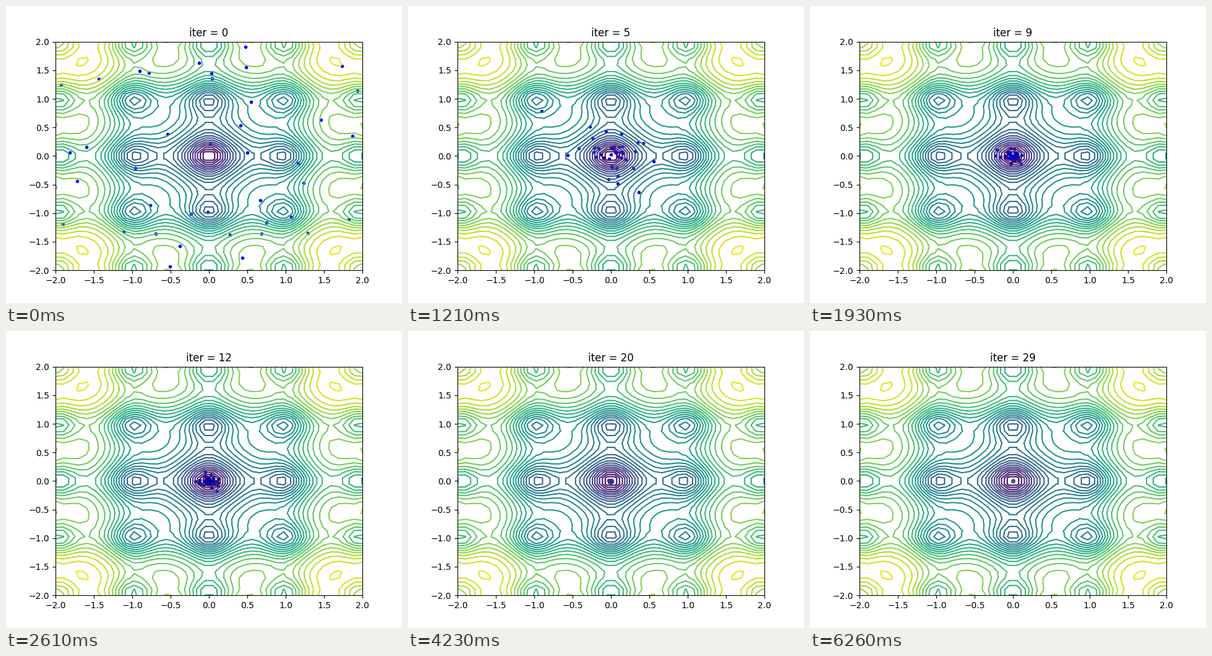
A matplotlib script for the animation above (6.28 s loop, 640 by 480 pixels).

```python
import numpy as np
import matplotlib.pyplot as plt
from matplotlib.animation import FuncAnimation
from matplotlib.colors import LinearSegmentedColormap

INTERVAL = 20
LOOP = 6280
COUNT = 40
ITERS = 30
STEPS = 10  # interpolation steps per iteration

FADE = LinearSegmentedColormap.from_list('fade', [
    (0, 'blue'), (0.3, 'mediumblue'), (0.55, 'navy'), (0.7, '#423682'), (1, '#32588c')])


def ackley(x, y):
    bowl = -20 * np.exp(-0.2 * np.sqrt(0.5 * (x ** 2 + y ** 2)))
    waves = -np.exp(0.5 * (np.cos(2 * np.pi * x) + np.cos(2 * np.pi * y)))
    return bowl + waves + 20 + np.e


def swarm():
    """Positions per iteration: one iteration at rest, then closing in on the optimum."""
    rng = np.random.default_rng(7)
    start = rng.uniform(-1.95, 1.95, (COUNT, 2))
    path = [start, start]
    for i in range(2, ITERS + 1):
        spread = np.exp(np.interp(i, [2, 6, 9, 16, 20, 29],
                                  np.log([0.34, 0.28, 0.08, 0.04, 0.013, 0.001])))
        path.append(rng.laplace(0, spread, (COUNT, 2)).clip(-1.15, 1.15))
    return np.array(path)


def step_at(ms):
    """Animation step on screen at a given time; the pace changes near the end."""
    step = np.interp(ms, [0, 250, 4090, 4730, 5420, 6040, 6260],
                     [0, 10, 202, 233, 268, 290, 299])
    return int(step + 1e-6)


PATH = swarm()

fig, ax = plt.subplots(figsize=(6.4, 4.8), dpi=100)
title = ax.set_title('iter = 0')
dots, = ax.plot([], [], 'b.')

axis = np.linspace(-2, 2, 40)
gx, gy = np.meshgrid(axis, axis)
ax.contour(gx, gy, ackley(gx, gy), 30)
ax.set_xlim(-2, 2)
ax.set_ylim(-2, 2)


def update(frame):
    it, sub = divmod(step_at(frame * INTERVAL + INTERVAL / 2), STEPS)
    pos = PATH[it] + (PATH[it + 1] - PATH[it]) * sub / STEPS
    dots.set_data(pos[:, 0], pos[:, 1])
    dots.set_color(FADE(it / (ITERS - 1)))
    title.set_text(f'iter = {it}')
    return dots, title


ani = FuncAnimation(fig, update, frames=LOOP // INTERVAL, interval=INTERVAL,
                    repeat=True, repeat_delay=0, blit=False)
plt.show()
```
